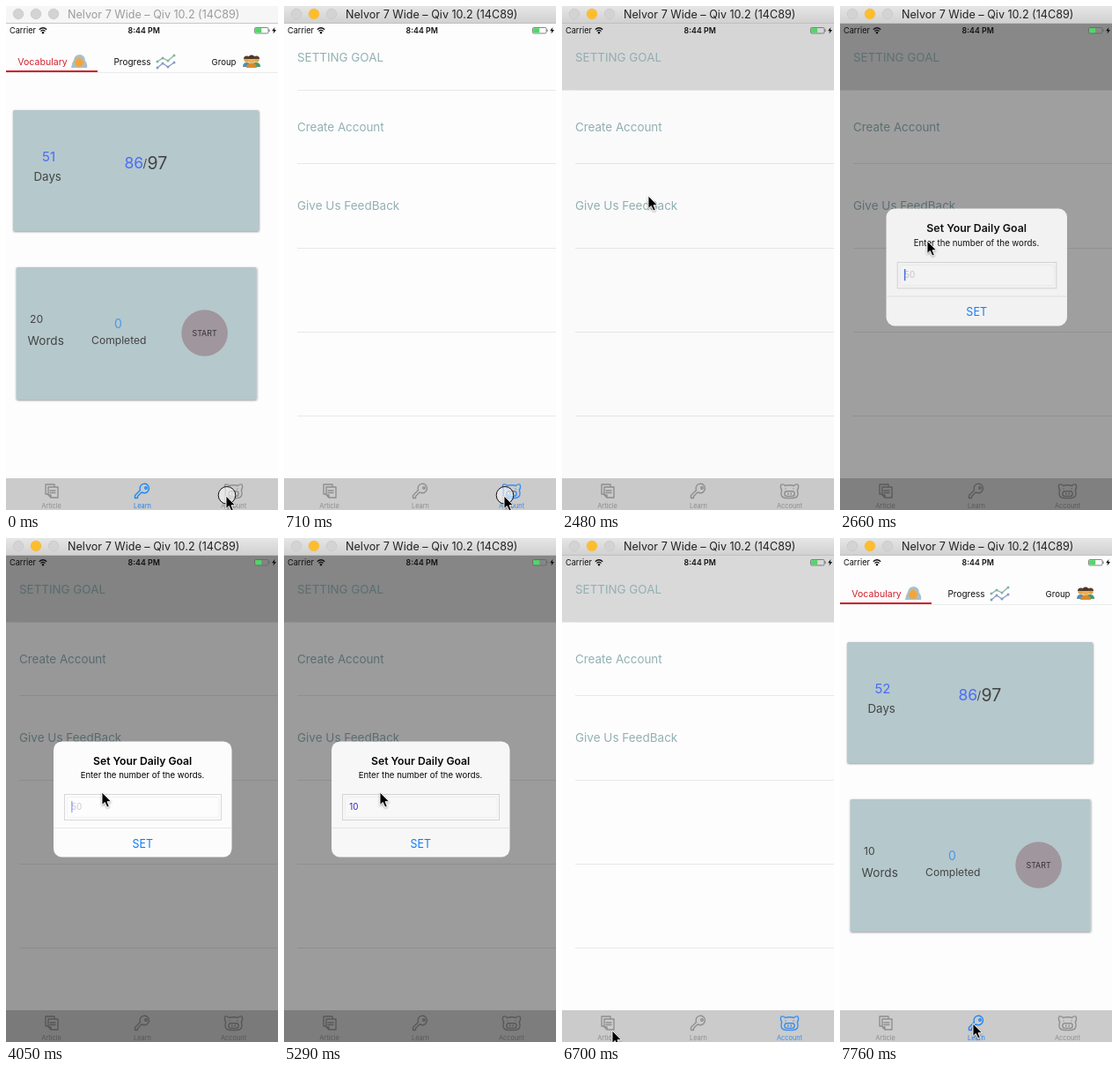
Recreate the animation shown at these times as an HTML page. Size 309x571 px, loop 8000 ms.

```html
<!DOCTYPE html>
<html lang="en">
<head>
<meta charset="utf-8">
<title>Daily goal</title>
<style>
html, body { margin: 0; width: 100%; height: 100%; overflow: hidden; background: #fdfdfd; }
svg { display: block; width: 309px; height: 571px; font-family: Inter, Roboto, sans-serif; }
.mid { text-anchor: middle; }
.tab { color: #8f8f8f; font-size: 7.4px; }
.tab text { fill: currentColor; text-anchor: middle; }
.tab g { fill: none; stroke: currentColor; stroke-width: 1.4; stroke-linejoin: round; stroke-linecap: round; }
</style>
</head>
<body>
<svg viewBox="0 0 309 571">
  <defs>
    <linearGradient id="chrome" x2="0" y2="1">
      <stop stop-color="#e6e6e6"/><stop offset="1" stop-color="#d0d0d0"/>
    </linearGradient>
    <filter id="soft" x="-10%" y="-10%" width="120%" height="120%">
      <feDropShadow dx="0.5" dy="0.8" stdDeviation="1.2" flood-opacity=".45"/>
    </filter>
    <filter id="lift" x="-50%" y="-50%" width="220%" height="220%">
      <feDropShadow dx="0" dy="1" stdDeviation="0.8" flood-opacity=".4"/>
    </filter>
  </defs>
  <rect width="309" height="571" fill="#fdfdfd"/>

  <g id="learn" fill="#444">
    <g class="mid" fill="#111">
      <text x="41.5" y="67" font-size="10.6" fill="#d0202e">Vocabulary</text>
      <text x="143.5" y="67" font-size="10">Progress</text>
      <text x="247.5" y="67" font-size="9.6">Group</text>
    </g>
    <path d="M0 75.5H309" stroke="#ececec"/>
    <path d="M0 74H104" stroke="#d0202e" stroke-width="2"/>
    <g>
      <path d="M74 70Q75 64 77 61Q78 55 84 55Q90 56 90 62Q93 66 92 70Z" fill="#a9c0c8"/>
      <circle cx="83" cy="64" r="5" fill="#f2a53c"/>
      <path d="M78 63Q83 57 88 63Q85 60 83 60Q80 60 78 63Z" fill="#dfe6e8"/>
    </g>
    <g fill="none" stroke-width="1.2">
      <path d="M172 63L178 59L184 62L191 56" stroke="#86b49c"/>
      <path d="M172 70L178 65L184 69L191 64" stroke="#8799c6"/>
      <path d="M172 63h0M178 59h0M184 62h0M191 56h0" stroke="#86b49c" stroke-width="3" stroke-linecap="round"/>
      <path d="M172 70h0M178 65h0M184 69h0M191 64h0" stroke="#8799c6" stroke-width="3" stroke-linecap="round"/>
    </g>
    <g>
      <path d="M269 69Q269 64 273.5 64T278 69Z" fill="#4f8fb8"/>
      <path d="M279 69Q279 64 284 64T289 69Z" fill="#3e9a78"/>
      <circle cx="273.5" cy="60.5" r="3.2" fill="#e9a347"/><circle cx="284.5" cy="60.5" r="3.2" fill="#e9a347"/>
      <path d="M270 60a3.5 3.5 0 0 1 7 0zM281 60a3.5 3.5 0 0 1 7 0z" fill="#54402f"/>
      <path d="M273 70Q273 65 279 65T285 70Z" fill="#d98a2c"/>
      <circle cx="279" cy="61" r="4" fill="#f2b04e"/>
      <path d="M275 60a4 4.5 0 0 1 8 0z" fill="#4a382c"/>
    </g>
    <g fill="#b5c8cc" filter="url(#soft)">
      <rect x="8" y="118" width="279" height="137" rx="1.5"/>
      <rect x="11.5" y="296" width="273" height="150" rx="1.5"/>
    </g>
    <text id="days" class="mid" x="48.5" y="175.5" font-size="15" fill="#4a6cf6"></text>
    <text class="mid" x="47.2" y="198" font-size="13.3">Days</text>
    <text x="134.5" y="183.5" font-size="17.5" fill="#4a6cf6">86</text>
    <text x="155.5" y="183" font-size="13">/</text>
    <text x="160.5" y="185" font-size="19.5">97</text>
    <text id="words" x="27" y="359" font-size="12.2"></text>
    <text class="mid" x="45.2" y="383.5" font-size="13.6">Words</text>
    <text class="mid" x="127.3" y="365" font-size="14" fill="#4a96f0">0</text>
    <text class="mid" x="128.3" y="383" font-size="12.1">Completed</text>
    <circle cx="225.6" cy="370.5" r="26.3" fill="#a0969e"/>
    <text class="mid" x="225.6" y="373.7" font-size="8.9" fill="#333">START</text>
  </g>

  <g id="account">
    <rect id="row" y="20" width="309" height="75.5" fill="#d9d9d9"/>
    <path d="M15 95.5H309M15 178.5H309M15 274.5H309M15 369.5H309M15 464.5H309" stroke="#e8e8e8"/>
    <g font-size="13.4" fill="#93b0b3">
      <text x="15" y="63">SETTING GOAL</text>
      <text x="15" y="142">Create Account</text>
      <text x="15" y="231.3" font-size="13.5">Give Us FeedBack</text>
    </g>
  </g>

  <rect y="535" width="309" height="36" fill="#cbcbcb"/>
  <g class="tab">
    <g><path d="M48 553H45V542H55V544M48 545H59V557H51L48 554ZM50 549H56M50 551.5H56M48 554H51V557"/></g>
    <text x="51.5" y="569">Article</text>
  </g>
  <g class="tab" id="learnTab">
    <g><path d="M154 551L149.5 555.5V557.5H146.5V554.5L152.5 548.5A5.2 5.2 0 1 1 156 551.5Z"/><circle cx="159" cy="546" r="1.3"/></g>
    <text x="155" y="569">Learn</text>
  </g>
  <g class="tab" id="accountTab">
    <g>
      <path d="M253.5 543.5Q258.500 542 263.500 543.500Q265.500 541.200 268 542.200Q269.500 545.500 267.300 548.300Q270 557.500 262 557.500H255Q247 557.500 249.700 548.300Q247.500 545.500 249 542.200Q251.500 541.200 253.500 543.500Z"/>
      <rect x="252.800" y="549.800" width="11.400" height="5.600" rx="2.800"/>
      <path d="M256.800 552V553.200M260.200 552V553.200M254 547h0M263 547h0"/>
    </g>
    <text x="258.5" y="569">Account</text>
  </g>

  <rect id="dim" y="20" width="309" height="551"/>

  <g fill="#111">
    <text x="4" y="31" font-size="9.2">Carrier</text>
    <path d="M37.8 26.8Q42 22.8 46.2 26.8M39.5 28.6Q42 26.2 44.5 28.6" fill="none" stroke="#111" stroke-width="1.3"/>
    <circle cx="42" cy="30.3" r="1.2"/>
    <text class="mid" x="156.7" y="31" font-size="8.8" font-weight="600">8:44 PM</text>
    <rect x="282.5" y="24.5" width="15.5" height="6.5" rx="1.2" fill="none" stroke="#666" stroke-width=".8"/>
    <rect x="283.2" y="25.2" width="7" height="5.1" fill="#4cd964"/>
    <path d="M299 26.5V29" stroke="#666"/>
    <path d="M305.5 24L302 28.3H304.2L303.5 31.5L307 27H304.8Z"/>
  </g>

  <g id="dialog">
    <rect x="54" y="230.5" width="202.5" height="131" rx="9.5" fill="#fcfcfc"/>
    <path d="M54 328.5H256.5" stroke="#e8e8ea"/>
    <text class="mid" x="155.2" y="257" font-size="12.2" font-weight="600">Set Your Daily Goal</text>
    <text class="mid" x="155" y="272" font-size="9.6">Enter the number of the words.</text>
    <rect x="66.5" y="290.5" width="178" height="29" fill="#fcfcfc" stroke="#d8d8da"/>
    <rect x="69.5" y="293.5" width="172.5" height="23" rx="3" fill="#fdfdfd" stroke="#f2f2f3"/>
    <text id="entry" x="74.2" y="308" font-size="9.8"></text>
    <path id="caret" d="M0 298V311" stroke="#426bf2" stroke-width="1.5"/>
    <text class="mid" x="155.2" y="350.5" font-size="12.4" fill="#0a7aff">SET</text>
  </g>

  <rect id="bar" width="309" height="20"/>
  <path d="M0 19.5H309" stroke="#bdbdbd" stroke-width=".8"/>
  <g stroke="#c6c6c6" stroke-width=".7" fill="#d3d3d3">
    <circle cx="14" cy="9" r="5.8"/>
    <circle cx="54" cy="9" r="5.8"/>
    <circle cx="34" cy="9" r="5.8"/>
  </g>
  <circle id="amber" cx="34" cy="9" r="6.1" fill="#fdbd2e"/>
  <text id="caption" class="mid" x="167.7" y="14" font-size="12.6">Nelvor 7 Wide – Qiv 10.2 (14C89)</text>

  <g id="pointer">
    <circle id="press" cx="1" cy="-.7" r="9.8" fill="#fff" fill-opacity=".55" stroke="#111"/>
    <path d="M0 0V14.5L3.3 11.5L5.8 17L8.3 16L6 10.7H10.5Z" stroke="#fff" stroke-width=".9" filter="url(#lift)"/>
  </g>
</svg>
<script>
const $ = id => document.getElementById(id);
const LOOP = 8000, TICK = 88.2;        // the screen is refreshed once per tick
const OPEN = 2458, CLOSE = 5278;       // alert transitions, in ms
const presses = [[0, 1], [7, 9], [23, 25], [86, 88]];

// Rows of [tick, value, ...]; linear between rows, held outside.
const path = [
  [0, 250, 555], [12, 250, 555], [13, 249, 554], [15, 249, 554], [16, 215, 430], [17, 155, 220],
  [18, 121, 118], [22, 108, 72], [25, 106, 74], [28, 98, 215], [30, 99, 266], [33, 106, 284],
  [36, 109, 288], [64, 109, 288], [65, 112, 287], [66, 112, 287], [67, 103, 340], [69, 72, 474],
  [70, 72, 474], [72, 92, 515], [74, 74, 552], [76, 57, 558], [78, 57, 558], [79, 72, 556],
  [81, 127, 553], [82, 127, 553], [84, 151, 550]
];
const blink = [[35, 1], [37, 0], [39, 0], [41, 1], [45, 1], [47, 0], [50, 0], [51, 1]];

function sample(keys, n) {
  const i = keys.findIndex(k => k[0] > n);
  if (i === 0) return keys[0].slice(1);
  if (i < 0) return keys[keys.length - 1].slice(1);
  const a = keys[i - 1], b = keys[i], p = (n - a[0]) / (b[0] - a[0]);
  return a.slice(1).map((v, j) => v + (b[j + 1] - v) * p);
}

// Critically damped spring: the distance left after the given time.
function spring(ms) {
  const s = Math.max(0, ms) * .02285;
  return (1 + s) * Math.exp(-s);
}

const show = (id, on) => $(id).style.display = on ? '' : 'none';
const set = (id, name, value) => $(id).setAttribute(name, value);

function draw(t) {
  const n = Math.floor((t + 8) / TICK), now = n * TICK;
  const active = n >= 7, onAccount = n >= 8 && n < 87, later = n >= 87;

  set('bar', 'fill', active ? 'url(#chrome)' : '#f6f6f6');
  show('amber', active);
  set('caption', 'fill', active ? '#222' : '#9c9c9c');

  show('learn', !onAccount);
  show('account', onAccount);
  show('row', n >= 24);
  $('days').textContent = later ? 52 : 51;
  $('words').textContent = later ? 10 : 20;

  const modal = n >= 28 && n < 62;
  $('learnTab').style.color = onAccount ? '' : '#1f86f5';
  $('accountTab').style.color = onAccount && !modal ? '#3a8ff0' : '';

  // The alert shrinks into place while it fades in, and only fades out.
  const rest = spring(now - OPEN), fade = n < 63 ? spring(now - CLOSE) : 0;
  set('dim', 'opacity', .4 * (1 - rest) * fade);
  set('dialog', 'opacity', Math.max(0, 1 - 1.4 * rest) * fade);
  set('dialog', 'transform', `translate(155.2 296) scale(${1 + .2 * rest}) translate(-155.2 -296)`);

  const typed = '10'.slice(0, Math.max(0, n - 50));
  $('entry').textContent = typed || '50';
  set('entry', 'fill', typed ? '#2a1fc4' : '#c9c9ce');
  set('caret', 'transform', `translate(${[74.8, 79.5, 86][typed.length]} 0)`);
  set('caret', 'opacity', n < 59 ? sample(blink, n)[0] : 0);

  show('press', presses.some(([from, to]) => n >= from && n < to));
  set('pointer', 'transform', `translate(${sample(path, n)})`);
}

const start = performance.now();
function loop() {
  draw((performance.now() - start) % LOOP);
  requestAnimationFrame(loop);
}
loop();
</script>
</body>
</html>
```
